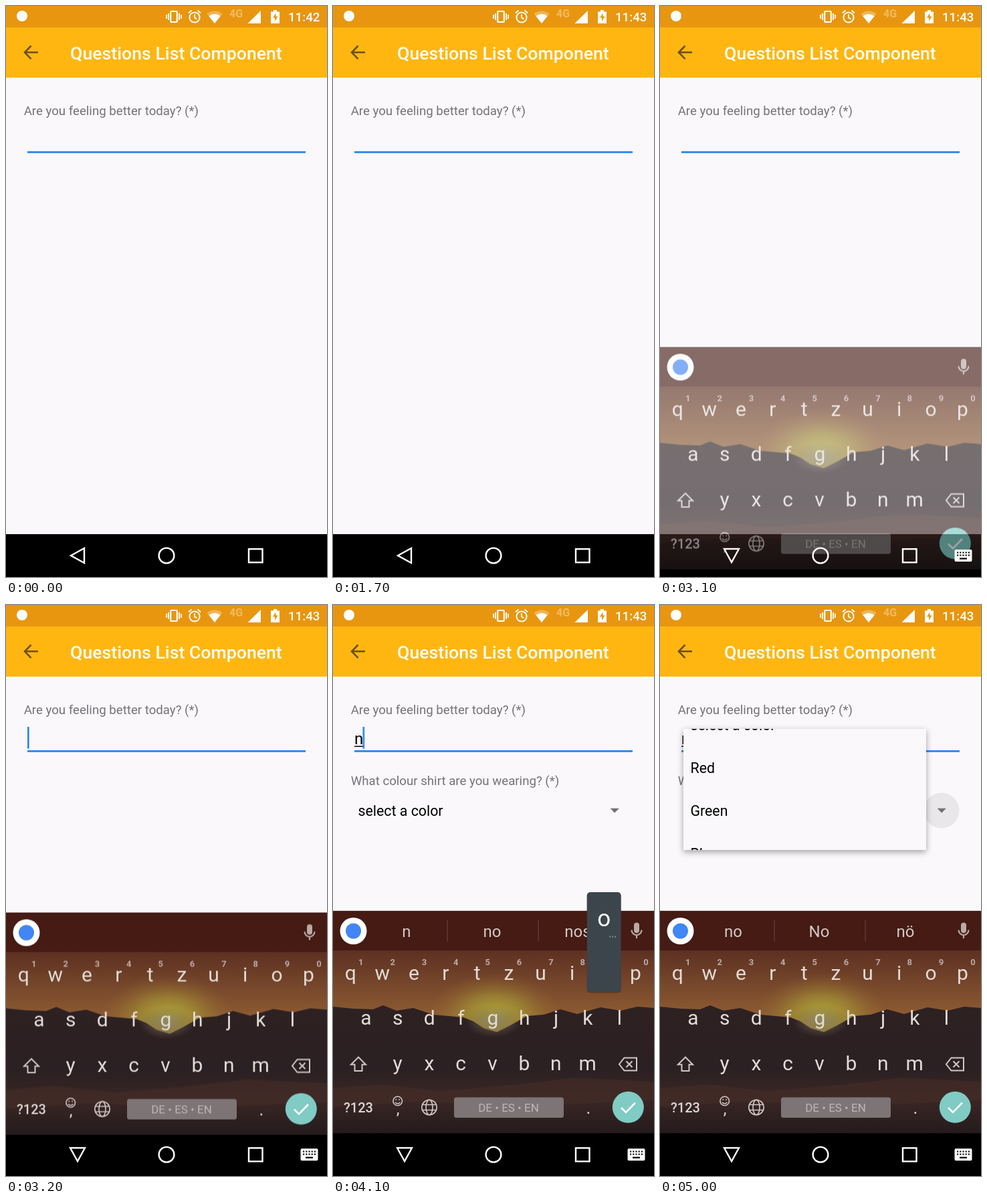
Write an HTML page that moves like this. It is 480 by 853 pixels and loops after 5.1 s.

```html
<!DOCTYPE html>
<html lang="en">
<head>
<meta charset="utf-8">
<title>Questions list</title>
<style>
  html, body { margin: 0; width: 100%; height: 100%; overflow: hidden; background: #faf8fb; }
  body { position: relative; font-family: Roboto, sans-serif; }
  svg { position: absolute; left: 0; top: 0; display: block; }
  .mid { text-anchor: middle; }
  .label { font-size: 18.67px; fill: #757278; }
  .item { font-size: 21.33px; }
  .entry { font-size: 24px; }
  .key { font-size: 30px; fill: #e2dcd8; }
  .hint { font-size: 13px; font-weight: 700; fill: #b9aca6; }
  .word { font-size: 24px; fill: #d3c9c6; }
  .line { fill: none; stroke: #fff; stroke-width: 2.4; }
  .soft { fill: none; stroke: #d0c8c5; stroke-width: 2; }

  /* one loop, hard changes */
  .a { animation: 5.1s step-end infinite; }
  .old { animation-name: old; }
  .new { animation-name: new; }
  .caret { animation-name: blink, move; }
  .back { animation-name: turn; transform-origin: 107px 821px; }
  .imeIcon { animation-name: imeIcon; }
  .board { animation-name: rise; }
  .pressN { animation-name: pressN; }
  .pressO { animation-name: pressO; }
  .second { animation-name: second; }
  .one { animation-name: one; }
  .two { animation-name: two; }
  .wordsA { animation-name: wordsA; }
  .wordsB { animation-name: wordsB; }
  .ripple { animation-name: ripple; transform-origin: 421px 307px; }

  @keyframes old { 0% { opacity: 1 } 3.92%, 100% { opacity: 0 } }
  @keyframes new { 0% { opacity: 0 } 3.92%, 100% { opacity: 1 } }
  @keyframes blink {
    0%, 13.72%, 33.33%, 52.94%, 92.15%, 100% { opacity: 0 }
    3.92%, 23.52%, 43.13%, 62.74% { opacity: 1 }
  }
  @keyframes move {
    0% { transform: none }
    74.5% { transform: translateX(12.5px) }
    82.35%, 100% { transform: translateX(26.5px) }
  }
  @keyframes turn {
    0% { transform: none }
    56.86% { transform: rotate(-50deg) }
    58.82%, 100% { transform: rotate(-90deg) }
  }
  @keyframes imeIcon { 0% { opacity: 0 } 56.86%, 100% { opacity: 1 } }
  @keyframes rise {
    0% { opacity: 0; transform: translateY(66px) }
    60.78% { opacity: .64; transform: translateY(52.5px) }
    62.74% { opacity: 1; transform: translateY(2.5px) }
    64.7%, 100% { opacity: 1; transform: none }
  }
  @keyframes pressN { 0%, 74.5%, 100% { opacity: 0 } 70.58% { opacity: 1 } }
  @keyframes pressO { 0%, 82.35%, 100% { opacity: 0 } 80.39% { opacity: 1 } }
  @keyframes second { 0% { opacity: 0 } 74.5%, 100% { opacity: 1 } }
  @keyframes one { 0%, 82.35%, 100% { opacity: 0 } 74.5% { opacity: 1 } }
  @keyframes two { 0% { opacity: 0 } 82.35%, 100% { opacity: 1 } }
  @keyframes wordsA { 0%, 84.31%, 100% { opacity: 0 } 74.5% { opacity: 1 } }
  @keyframes wordsB { 0% { opacity: 0 } 84.31%, 100% { opacity: 1 } }
  @keyframes ripple {
    0% { opacity: 0; transform: scale(.3) }
    90.19% { opacity: 1; transform: scale(.5) }
    92.15% { opacity: 1; transform: scale(.8) }
    94.11%, 100% { opacity: 1; transform: none }
  }

  .menu {
    position: absolute; left: 35px; top: 185px; width: 363px; height: 181px;
    overflow: hidden; background: #faf8fb;
    box-shadow: 0 3px 9px rgba(0, 0, 0, .36);
    animation-name: open;
  }
  .menu ul {
    position: absolute; left: 10.5px; top: -37px; margin: 0; padding: 0;
    list-style: none; font-size: 21.33px; line-height: 64px; white-space: nowrap;
    animation-name: list;
  }
  @keyframes open {
    0% { opacity: 0; top: 245px; height: 95px }
    96.07% { opacity: 1; top: 245px; height: 95px }
    98.03%, 100% { opacity: 1; top: 185px; height: 181px }
  }
  @keyframes list { 0% { top: -97px } 98.03%, 100% { top: -37px } }
</style>
</head>
<body>
<svg width="480" height="853" viewBox="0 0 480 853">
  <defs>
    <linearGradient id="sky" x1="0" y1="0" x2="0" y2="1">
      <stop offset="0" stop-color="#5c3022"/>
      <stop offset=".55" stop-color="#80502e"/>
      <stop offset="1" stop-color="#9c6a36"/>
    </linearGradient>
    <radialGradient id="glow">
      <stop offset="0" stop-color="#b5ab3c"/>
      <stop offset=".45" stop-color="#a08c34" stop-opacity=".75"/>
      <stop offset="1" stop-color="#906030" stop-opacity="0"/>
    </radialGradient>
    <radialGradient id="haze">
      <stop offset="0" stop-color="#8a8468" stop-opacity=".85"/>
      <stop offset="1" stop-color="#6a5a50" stop-opacity="0"/>
    </radialGradient>
    <linearGradient id="land" x1="0" y1="0" x2="0" y2="1">
      <stop offset="0" stop-color="#2e2122"/>
      <stop offset=".5" stop-color="#2b2023"/>
      <stop offset=".72" stop-color="#3a2724"/>
      <stop offset="1" stop-color="#251b1d"/>
    </linearGradient>
  </defs>

  <rect width="480" height="853" fill="#faf8fb"/>
  <rect width="480" height="107" fill="#ffb610"/>
  <rect width="480" height="32" fill="#e8960f"/>

  <!-- status bar -->
  <g fill="#fff">
    <circle cx="24" cy="15" r="8"/>
    <rect x="246.2" y="8" width="9.6" height="16" rx="1" fill="none" stroke="#fff" stroke-width="2.2"/>
    <path d="M240 13v6M243 11v10M259 11v10M262 13v6" stroke="#fff" stroke-width="1.8"/>
    <circle cx="282" cy="17" r="7.6" fill="none" stroke="#fff" stroke-width="2"/>
    <path d="M282 12.500v5l3.500 2M273 10.500l4.500-4M291 10.500l-4.500-4" fill="none" stroke="#fff" stroke-width="1.8"/>
    <path d="M312 26L300.500 11.500Q312 3.500 323.500 11.500Z" opacity=".3"/>
    <path d="M312 26L303.300 15Q312 9 320.700 15Z"/>
    <text class="mid" x="344" y="17" font-size="16" font-weight="700" opacity=".35">4G</text>
    <path d="M381 7v19h-19.500z"/>
    <path d="M396 8.500h4v-2.500h5v2.500h4v17.500h-13z"/>
    <path d="M403.500 10.500l-4.500 7h3v5.500l4.500-7.500h-3z" fill="#e8960f"/>
    <g font-size="18.67" font-weight="500">
      <text class="a old" x="422" y="23.300">11:42</text>
      <text class="a new" x="422" y="23.300">11:43</text>
    </g>
  </g>

  <!-- toolbar -->
  <path d="M48 69.300H29M37.500 59.500L28 69.300l9.500 9.800" fill="none" stroke="#6b501a" stroke-width="2.600"/>
  <text x="96" y="80" font-size="26.670" font-weight="500" fill="#fff">Questions List Component</text>

  <!-- form -->
  <text class="label" x="26.700" y="163">Are you feeling better today? (*)</text>
  <rect x="32" y="217" width="416" height="2.700" fill="#2383f3"/>
  <g class="a one">
    <text class="entry" x="32" y="208">n</text>
    <rect x="32" y="210.500" width="13" height="1.500"/>
  </g>
  <g class="a two">
    <text class="entry" x="32" y="208">no</text>
    <rect x="32" y="210.500" width="27" height="1.500"/>
  </g>
  <rect class="a caret" x="32" y="182" width="2.600" height="32.500" fill="#2383f3"/>
  <g class="a second">
    <text class="label" x="26.700" y="269">What colour shirt are you wearing? (*)</text>
    <circle class="a ripple" cx="421" cy="307" r="26.500" fill="#e9e7ea"/>
    <text class="item" x="37.500" y="314.500">select a color</text>
    <path d="M414.500 303.700h13.400l-6.700 6.700z" fill="#737176"/>
  </g>
</svg>

<div class="a menu">
  <ul class="a"><li>select a color</li><li>Red</li><li>Green</li><li>Blue</li></ul>
</div>

<svg width="480" height="853" viewBox="0 0 480 853">
  <rect y="789" width="480" height="64"/>

  <g class="a board">
    <rect y="456" width="480" height="2" fill="#000" opacity=".12"/>
    <rect y="515" width="480" height="130" fill="url(#sky)"/>
    <ellipse cx="242" cy="612" rx="100" ry="62" fill="url(#glow)"/>
    <path fill="url(#land)" d="M0 600L30 603 60 604 75 598 95 606 120 602 150 612 195 616 210 622 225 632 245 638 265 628 290 614 315 612 340 604 365 611 400 601 430 606 455 600 480 602V789H0Z"/>
    <ellipse cx="240" cy="622" rx="42" ry="24" fill="url(#haze)"/>
    <path d="M0 722L70 716 160 726 260 718 360 706 480 712V740L300 748 120 742 0 750Z" fill="#493029" opacity=".45"/>
    <rect y="457" width="480" height="59" fill="#451b14"/>

    <circle cx="30.500" cy="487" r="20" fill="#fff"/>
    <circle cx="30.500" cy="487" r="11.500" fill="#4285f4"/>
    <g class="a second" fill="#fff" opacity=".15">
      <path d="M171 471v32M307 471v32" stroke="#8a665f" stroke-opacity=".6"/>
    </g>
    <g class="a wordsA word mid">
      <text x="110" y="496">n</text><text x="238" y="496">no</text><text x="366" y="496">nos</text>
    </g>
    <g class="a wordsB word mid">
      <text x="109.500" y="496">no</text><text x="238" y="496">No</text><text x="367" y="496">nö</text>
    </g>
    <rect x="450" y="474.500" width="8" height="15.500" rx="4" fill="#b9aaa6"/>
    <path d="M446.500 485.500a7.500 7.500 0 0 0 15 0M454 493v5" fill="none" stroke="#b9aaa6" stroke-width="2.200"/>

    <g id="keys" class="mid"></g>

    <path class="soft" d="M38 675.500L27 686.500h5.500v9.500h11v-9.500h5.500z"/>
    <path class="soft" d="M435.500 676.500h18.500v19h-18.500l-7.500-9.500zM438.500 681.500l9 9M447.500 681.500l-9 9"/>
    <text class="mid" x="38" y="757.500" font-size="20" font-weight="500" fill="#ded8d5">?123</text>
    <g class="soft" style="stroke-width:1.600">
      <circle cx="96.700" cy="741" r="6.800"/>
      <path d="M93 743q3.700 4 7.400 0M94.300 738v1.800M99.100 738v1.800"/>
      <circle cx="144" cy="750.500" r="11.200"/>
      <ellipse cx="144" cy="750.500" rx="5" ry="11.200"/>
      <path d="M133.800 746.500h20.400M133.800 754.500h20.400"/>
    </g>
    <text class="mid key" x="97" y="761" style="font-size:24px">,</text>
    <rect x="181" y="735.500" width="164" height="30.500" rx="3.500" fill="#7c7475"/>
    <text class="mid" x="262.500" y="757" font-size="17" fill="#bdb7b7">DE • ES • EN</text>
    <text class="mid key" x="382" y="760" style="font-size:26px">.</text>
    <circle cx="441.300" cy="750.300" r="23.500" fill="#80cbc4"/>
    <path d="M431 751l7 7 14-14.500" fill="none" stroke="#fff" stroke-width="2.600"/>
  </g>

  <g id="pops" class="mid"></g>

  <!-- navigation bar -->
  <g class="line">
    <path class="a back" d="M97 821L117 810V832Z"/>
    <circle cx="240" cy="821" r="11.400"/>
    <rect x="363" y="811.200" width="20.500" height="20"/>
  </g>
  <g class="a imeIcon">
    <rect x="440.500" y="812" width="26" height="18" rx="2" fill="#fff"/>
    <path d="M444 816.500h20M444 820.500h20" stroke="#000" stroke-width="2.200" stroke-dasharray="2.200 2"/>
    <path d="M448 825.500h11" stroke="#000" stroke-width="2.200"/>
  </g>
</svg>

<script>
  const NS = 'http://www.w3.org/2000/svg';
  const STEP = 47.35;

  function add(parent, tag, attrs, text) {
    const el = document.createElementNS(NS, tag);
    for (const name in attrs) el.setAttribute(name, attrs[name]);
    if (text) el.textContent = text;
    parent.appendChild(el);
    return el;
  }

  const keys = document.getElementById('keys');
  const rows = [['qwertzuiop', 26.3, 559.5], ['asdfghjkl', 49.5, 627], ['yxcvbnm', 96.5, 694.5]];
  rows.forEach(([letters, left, y], row) => {
    [...letters].forEach((letter, i) => {
      const x = left + i * STEP;
      add(keys, 'text', { class: 'key', x, y }, letter);
      if (row === 0) add(keys, 'text', { class: 'hint', x: x + 15.5, y: 538 }, String((i + 1) % 10));
    });
  });

  // enlarged preview above a pressed key
  function preview(letter, x, top, name) {
    const g = add(document.getElementById('pops'), 'g', { class: 'a ' + name });
    add(g, 'rect', { x: x - 25.5, y: top + 1.5, width: 51, height: 149, rx: 5, opacity: .25 });
    add(g, 'rect', { x: x - 25.5, y: top, width: 51, height: 149, rx: 5, fill: '#3c454b' });
    add(g, 'text', { x, y: top + 51, 'font-size': 35, fill: '#fff' }, letter);
    for (let i = 0; i < 3; i++) {
      add(g, 'rect', { x: x + 8 + i * 4, y: top + 65.5, width: 2, height: 2, fill: '#879095' });
    }
  }
  preview('n', 333, 563.5, 'pressN');
  preview('o', 405.2, 429, 'pressO');
</script>
</body>
</html>
```
